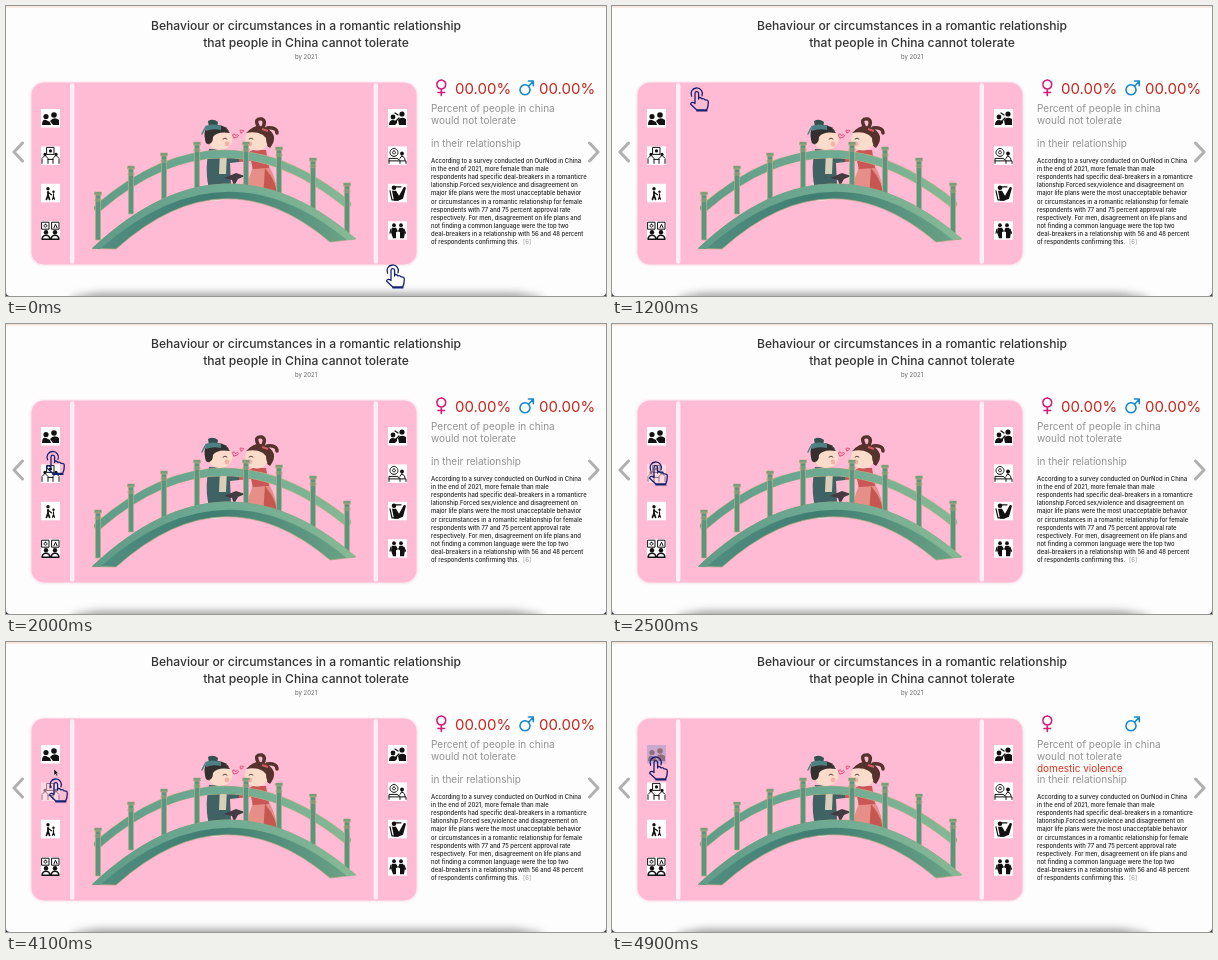
Write an HTML page that moves like this. It is 600 px wide and 290 px high and loops after 5 s.

```html
<!DOCTYPE html>
<html lang="en">
<head>
<meta charset="utf-8">
<style>
  html, body { margin: 0; width: 100%; height: 100%; overflow: hidden; background: #fdfdfd; }
  svg { display: block; width: 600px; height: 290px; font-family: Inter, "Noto Sans", sans-serif; }
  .line { fill: none; stroke-linecap: round; stroke-linejoin: round; }
  .title { font-size: 12.1px; font-weight: 500; fill: #333; text-anchor: middle; }
  .lead { font-size: 10px; fill: #929292; }
  .body { font-size: 5.9px; font-weight: 500; fill: #222; }
  .num { font-size: 15px; fill: #c5271f; }
</style>
</head>
<body>
<svg viewBox="0 0 600 290">
  <defs>
    <linearGradient id="deck">
      <stop offset="0" stop-color="#528f80"/><stop offset=".45" stop-color="#3f7d72"/><stop offset="1" stop-color="#6da487"/>
    </linearGradient>
    <linearGradient id="top" gradientUnits="userSpaceOnUse" x1="86" x2="350">
      <stop offset="0" stop-color="#5f9b88"/><stop offset=".5" stop-color="#6faa93"/><stop offset="1" stop-color="#86b995"/>
    </linearGradient>
    <filter id="blur" x="-10%" y="-200%" width="120%" height="500%"><feGaussianBlur stdDeviation="4"/></filter>
    <filter id="soft"><feGaussianBlur stdDeviation="1"/></filter>
  </defs>

  <rect width="600" height="1.6" fill="#f2e4da"/>
  <path d="M66 292L90 287.5H510L536 292V298H66Z" fill="#999" filter="url(#blur)"/>
  <path d="M0 286Q0 290 4 290H0ZM600 286Q600 290 596 290H600Z" fill="#334"/>

  <text class="title" x="300" y="23.5">Behaviour or circumstances in a romantic relationship</text>
  <text class="title" x="300" y="41">that people in China cannot tolerate</text>
  <text x="300" y="53" font-size="6" fill="#666" text-anchor="middle">by 2021</text>
  <path class="line" d="M16.5 137L8 146L16.5 155M583.5 137L592 146L583.5 155" stroke="#b0b0b0" stroke-width="3"/>

  <rect x="24.5" y="76" width="387" height="183.5" rx="13" fill="#f9dfe8" filter="url(#soft)"/>
  <rect x="25.5" y="76.5" width="385" height="182" rx="12.5" fill="#febbd3"/>
  <path class="line" d="M66.2 79.5V255.5M369.8 79.5V255.5" stroke="#fdeef3" stroke-width="4.4"/>

  <!-- couple -->
  <g stroke-linejoin="round">
    <path d="M201 176H223L226 189Q211 199 198 192Z" fill="#e9dfdb"/>
    <path d="M203 143L222 144L234 150L233 156L224 157L225 179H202Q199 160 203 143Z" fill="#3f6265"/>
    <path d="M214 145L221 146L220 168H213Z" fill="#d8cfbb"/>
    <path d="M247 144L259 144L263 160Q272 176 271 192Q252 199 236 191L246 164Z" fill="#e58f88"/>
    <path d="M259 162Q272 177 271 192Q262 196 257 192Z" fill="#c4574f"/>
    <path d="M247 144L260 144L263 162L247 163L245 155L233 156V151Z" fill="#cb5656"/>
    <path d="M218 172L230 167L239 170L232 173L228 180L226 174Z" fill="#433a42"/>
    <path d="M200 137Q195 120 207 119Q222 118 224 128L210 142Z" fill="#33302f"/>
    <ellipse cx="214" cy="133" rx="12.5" ry="11" fill="#fbdccb"/>
    <path d="M200 137Q197 122 207 121Q219 119 224 127Q211 125 207 131Q207 137 203 138Z" fill="#33302f"/>
    <path d="M203 121L202 115Q207 112 212 116L211 122Z" fill="#31504f"/>
    <path d="M199 120Q207 117 215 120V124Q207 122 200 125Z" fill="#4c8183"/>
    <path class="line" d="M199 122L196 128" stroke="#4c8183" stroke-width="1.5"/>
    <path d="M242 126Q250 116 262 123Q273 130 264 142Z" fill="#56322d"/>
    <ellipse cx="251" cy="133.5" rx="12" ry="11" fill="#fbdccb"/>
    <path d="M240 127Q251 116 262 123Q271 132 263 141Q260 138 260 132Q253 124 240 127Z" fill="#56322d"/>
    <path class="line" d="M252 120Q248 112 256 113Q260 115 257 121M261 122Q271 121 271 127" stroke="#56322d" stroke-width="3.5"/>
    <path d="M256 123L262 125" stroke="#d45c63" stroke-width="2"/>
    <g fill="#f5b0a9"><circle cx="221" cy="138" r="2.4"/><circle cx="244" cy="138" r="2.4"/></g>
    <path class="line" d="M217 133q2-2 4 0M243 133q2-2 4 0" stroke="#44302c" stroke-width=".9"/>
    <path class="line" d="M228 132q-3-4 0-4q1 0 1.5 1.5q2-2 3 0q0 2-4.5 2.5M235 127q-2-3 0-3q1 1 2 0q2 1-2 3" stroke="#e83f70" stroke-width=".9"/>
  </g>

  <!-- bridge -->
  <g>
    <path class="line" d="M92 202Q215 96 341 198" stroke="#b9ae80" stroke-width="8.4"/>
    <path class="line" d="M92 202Q215 96 341 198" stroke="url(#top)" stroke-width="7.2"/>
    <g id="posts"></g>
    <path d="M86 242.5Q218 118 350 233L324 236Q218 146 110 243Z" fill="url(#deck)" stroke="#a9a87b" stroke-width=".7"/>
    <path d="M86 242.5Q218 118 350 233L341 234Q218 133 94 243Z" fill="url(#top)"/>
  </g>

  <g id="icons"></g>

  <g class="line" stroke-width="1.6">
    <path d="M435.3 74a4.5 4.5 0 1 1-.01 0M435.3 83V89.5M432 86.5H438.6" stroke="#d71979"/>
    <path d="M519 78.8a5 5 0 1 1-.01 0M522.8 80L527 75.5M522.5 75H527.3V79.8" stroke="#1689d2"/>
  </g>
  <g id="nums" class="num"><text x="449" y="88">00.00%</text><text x="533" y="88">00.00%</text></g>
  <g class="lead">
    <text x="425" y="106">Percent of people in china</text>
    <text x="425" y="118">would not tolerate</text>
    <text id="topic" x="425" y="130" fill="#e0301e">domestic violence</text>
    <text x="425" y="141">in their relationship</text>
  </g>
  <g id="para" class="body"></g>
  <text x="517" y="237.8" font-size="6" fill="#999">[6]</text>

  <path id="arrow" d="M48 127V133.5L49.6 132L50.7 134.3L51.7 133.8L50.7 131.6H52.6Z" fill="#111" stroke="#fff" stroke-width=".4"/>
  <path id="hand" class="line" stroke="#17206f" stroke-width="1.3"
    d="M-4 4V-5.5a1.8 1.8 0 0 1 3.6 0V0M-.4-1.2q2-1 3.3 1q2-.8 3.2 1q3.2-.2 3.2 2.6q0 4-1.6 7.6H-2.2L-8.5 5q1.5-3 4.5-.5M-2.2 11.8H8M-7.4-2.8a5.7 5.7 0 1 1 10.4-.4"/>
</svg>
<script>
const $ = id => document.getElementById(id);

const lines = [
  "According to a survey conducted on OurNod in China",
  "in the end of 2021, more female than male",
  "respondents had specific deal-breakers in a romanticre",
  "lationship.Forced sex/violence and disagreement on",
  "major life plans were the most unacceptable behavior",
  "or circumstances in a romantic relationship for female",
  "respondents with 77 and 75 percent approval rate",
  "respectively. For men, disagreement on life plans and",
  "not finding a common language were the top two",
  "deal-breakers in a relationship with 56 and 48 percent",
  "of respondents confirming this."
];
$("para").innerHTML = lines.map((s, i) => `<text x="425" y="${157.2 + i * 8.06}">${s}</text>`).join("");

// x, top, bottom
const posts = [[92, 188, 234], [125, 162, 208], [158, 149, 193], [191, 138, 184],
  [240, 138, 184], [273, 143, 188], [307, 154, 203], [341, 179, 227]];
$("posts").innerHTML = posts.map(([x, a, b]) =>
  `<path d="M${x - 2.5} ${a}h5V${b}h-5ZM${x - 3.5} ${a - 2}h7v3h-7ZM${x - 3} ${a + 5}h6v2h-6Z"
    fill="#5a9581" stroke="#b9ae80" stroke-width=".7"/>`).join("");

const dot = (x, y, r = 2.2) => `<circle cx="${x}" cy="${y}" r="${r}"/>`;
const fill = d => `<path d="${d}"/>`;
const draw = (d, w = 1) => `<path class="line" d="${d}" stroke="#111" stroke-width="${w}"/>`;
const art = [
  dot(5, 7.5, 2.6) + dot(13, 6, 2.8) + fill("M1 16Q1 10 5 11L9 13L10 16ZM9 12Q13 7 18 11V16H12Z"),
  draw("M6 1H13V8H6ZM1 12L4 9L7 12V17M18 12L15 9L12 12V17M1 17V13M18 17V13M7 13H12") + dot(9.5, 4.5, 1.6) + dot(4, 8, 1.6) + dot(15, 8, 1.6),
  dot(7, 5, 1.7) + dot(12.5, 8, 1.2) + draw("M7 8V11.5L5.5 15.5M7 11.5L8.5 15.5", 1.8) + draw("M7 8.5L10.5 11M12.5 10V13L11.5 15.5M12.5 13L13.5 15.5", 1.2),
  draw("M1 1H8V8H1ZM11 1H18V8H11ZM13 6.5L14.5 3L16 6.5M4.5 3a1.5 1.5 0 1 1-.01 0") + dot(5, 11) + dot(14, 11) + draw("M1 18Q1.5 14 5 14T9 18ZM10 18Q10.5 14 14 14T18 18Z", 1.4),
  dot(5, 8, 2.4) + dot(14, 5, 2.6) + fill("M1 16Q1 11 5 11L9 12V14L7 16ZM11 16L10 11Q13 7 18 10V16Z") + draw("M7 4L10 6M8 12L11 9", 1.3),
  draw("M6 2a4 4 0 1 1-.01 0M6 4.5a1.5 1.5 0 1 1-.01 0M1 17V12H9L12 14V17M1 14.5H18V17M14 9L12 12M14 10Q17 10 17 14") + dot(14, 7, 1.9),
  dot(6, 4, 2.3) + fill("M4 7H8L11 12L16 3L18 4L15 15L10 17H6Z") + draw("M2 7L4 16H10M8 3H13", 1.2),
  dot(6, 4, 1.9) + dot(13, 4, 1.9) + fill("M4 6.5H8L10 10L8 11V17H5L3 11ZM11.5 6.5H15L17 11L16 17H12V11L10 10Z") + draw("M3 8L2 12M16 8L17.5 12", 1.2)
];
const iconAt = i => [i < 4 ? 35 : 382, 103 + (i % 4) * 37.4];
$("icons").innerHTML = art.map((a, i) =>
  `<g transform="translate(${iconAt(i)})" fill="#111"><rect width="19" height="18.5" fill="#fff"/>${a}</g>`).join("");
const icons = [...$("icons").children];

// time, x, y of the hand
const path = [
  [0, 389, 270], [600, 389, 270], [800, 87, 104], [1000, 87, 93], [1300, 87, 93],
  [1500, 55, 120], [1700, 53, 120], [1900, 51, 122], [2100, 47, 155], [2300, 48, 231],
  [2500, 46, 149], [2800, 48, 231], [3100, 48, 231], [3400, 56, 205], [3800, 48, 231],
  [4100, 52, 148], [4400, 48, 231], [4800, 46, 128], [4900, 46, 126], [5000, 46, 126]
];
function handAt(t) {
  const i = path.findIndex(k => k[0] > t);
  const [t0, x0, y0] = path[i - 1], [t1, x1, y1] = path[i];
  let u = (t - t0) / (t1 - t0);
  u *= u * (3 - 2 * u);
  return [x0 + (x1 - x0) * u, y0 + (y1 - y0) * u];
}

const show = (id, on) => $(id).style.display = on ? "" : "none";

function render(now) {
  const t = Math.floor(now % 5000 / 100) * 100;
  const [x, y] = handAt(t);
  const clicked = t >= 4900;
  $("hand").setAttribute("transform", `translate(${x},${y})`);
  icons.forEach((icon, i) => {
    const [ix, iy] = iconAt(i), dx = x - 2 - ix, dy = y - 7 - iy;
    const over = dx > 0 && dx < 19 && dy > 0 && dy < 18.5;
    icon.style.opacity = over ? .45 : 1;
    icon.firstChild.style.fill = over && clicked ? "#8f92c8" : "";
  });
  show("arrow", t >= 4000 && t < 4200);
  show("nums", !clicked);
  show("topic", clicked);
  requestAnimationFrame(render);
}
requestAnimationFrame(render);
</script>
</body>
</html>
```
